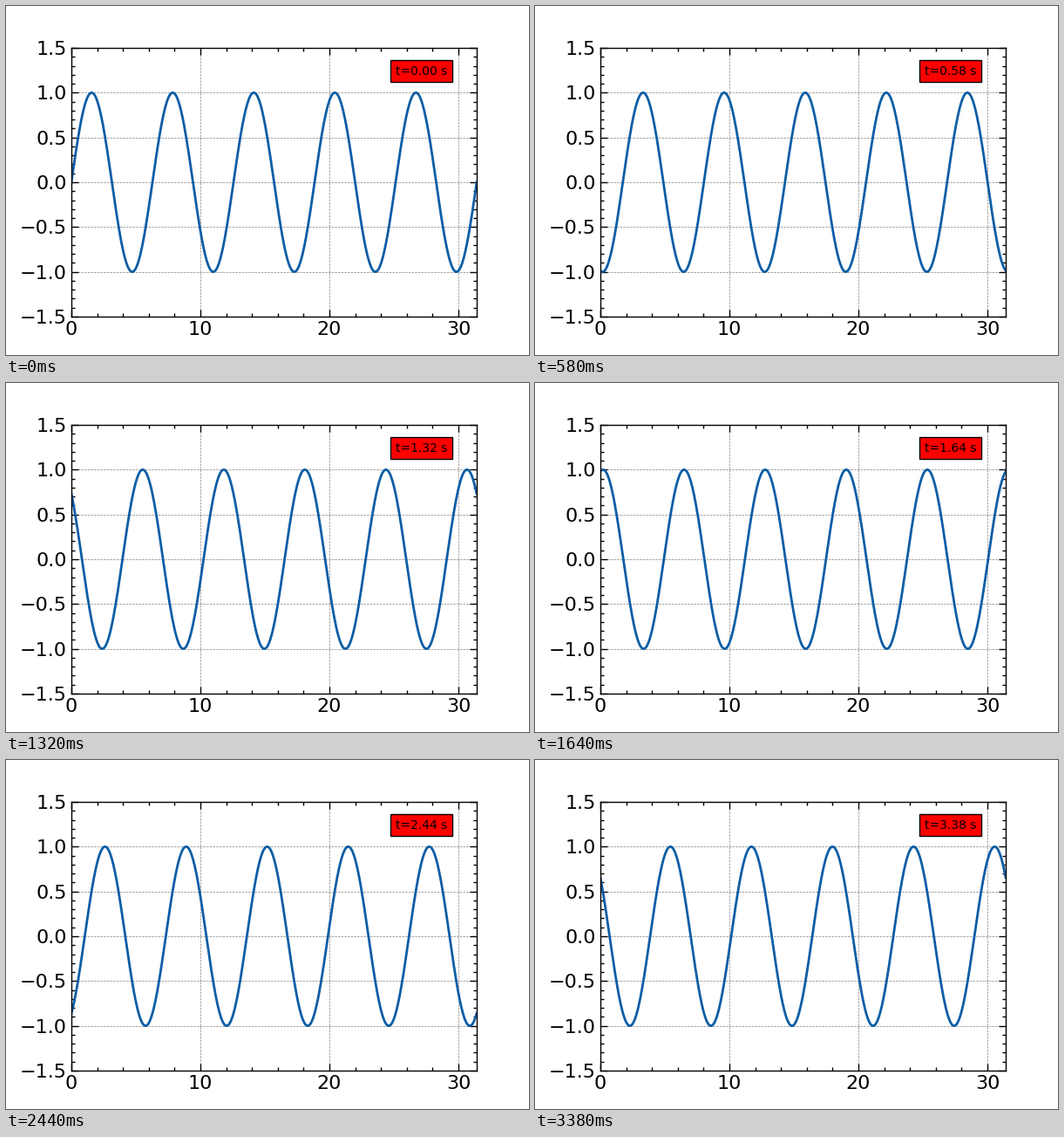
These frames come from a looping animation (600x400 px, 3.4 s). A matplotlib script:

```python
import numpy as np
import matplotlib.pyplot as plt
from matplotlib.animation import FuncAnimation
from matplotlib.ticker import AutoMinorLocator, MultipleLocator

FRAMES = 170
STEP_MS = 20
SPEED = 3  # phase in radians per second

plt.rcParams["font.family"] = "DejaVu Sans"

fig, ax = plt.subplots(figsize=(6, 4), dpi=100)
fig.subplots_adjust(left=0.125, right=0.9, bottom=0.11, top=0.88)

ax.set_xlim(0, 10 * np.pi)
ax.set_ylim(-1.5, 1.5)
ax.xaxis.set_major_locator(MultipleLocator(10))
ax.yaxis.set_major_locator(MultipleLocator(0.5))
for axis in (ax.xaxis, ax.yaxis):
    axis.set_minor_locator(AutoMinorLocator(5))

ax.tick_params(which="both", direction="in", top=True, right=True, width=1)
ax.tick_params(which="major", length=6, labelsize=16)
ax.tick_params(which="minor", length=3)
ax.grid(color="black", linestyle="--", linewidth=0.5, alpha=0.5)
for spine in ax.spines.values():
    spine.set_linewidth(1)

x = np.linspace(0, 10 * np.pi, 1000)
wave, = ax.plot(x, np.sin(x), color="#0C5DA5", linewidth=2)
clock = ax.text(0.8, 0.9, "", transform=ax.transAxes, fontsize=10,
                bbox=dict(facecolor="red", edgecolor="black"))


def update(frame):
    t = frame * STEP_MS / 1000
    wave.set_ydata(np.sin(x - SPEED * t))
    clock.set_text(f"t={t:.2f} s")
    return wave, clock


anim = FuncAnimation(fig, update, frames=FRAMES, interval=STEP_MS,
                     repeat=True, repeat_delay=0)
plt.show()
```
